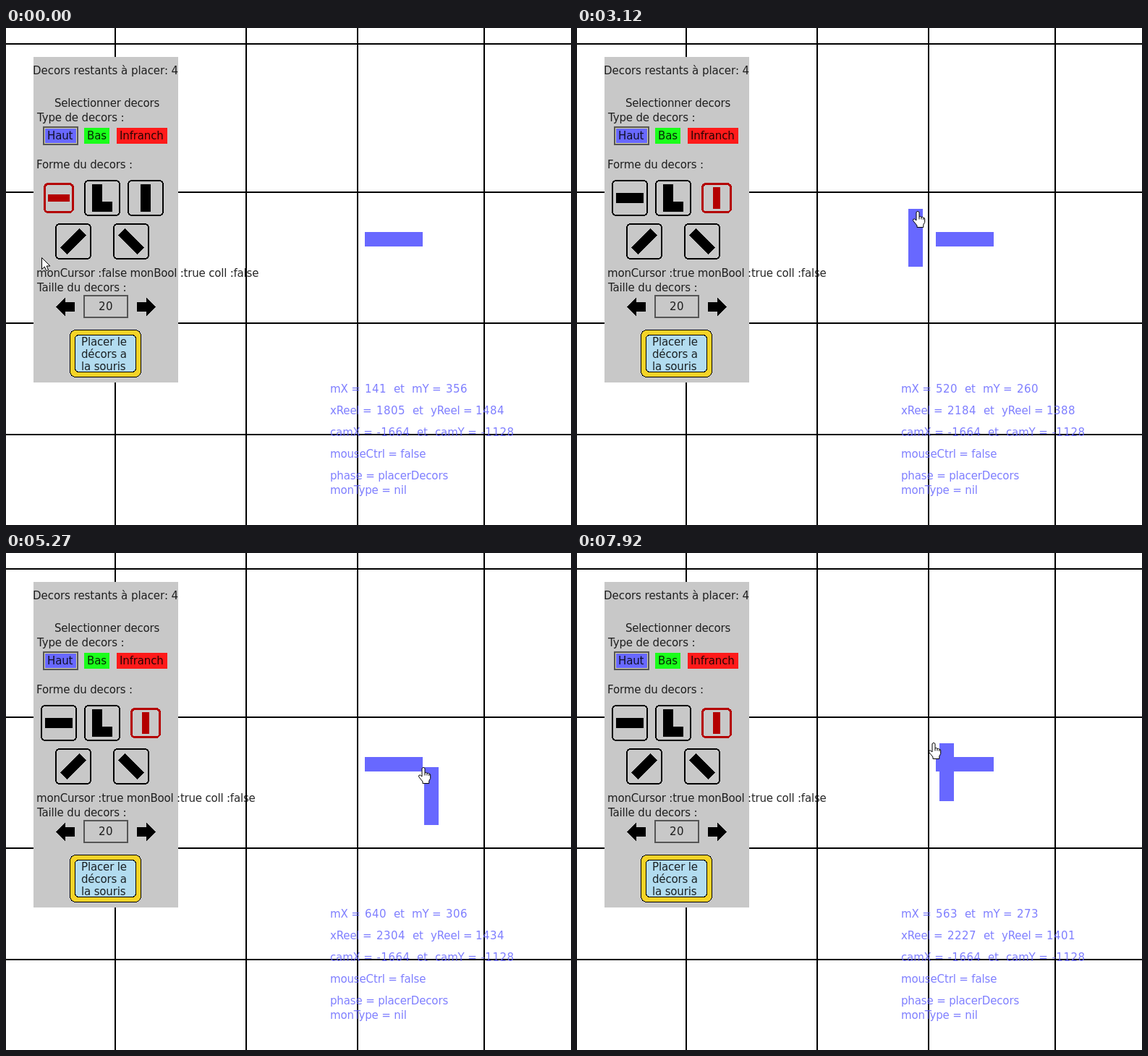
These frames come from a looping animation (781 by 687 pixels, 7990 ms). An HTML page:

```html
<!DOCTYPE html>
<html lang="fr">
<head>
<meta charset="utf-8">
<title>Placement des décors</title>
<style>
  html, body { margin: 0; width: 100%; height: 100%; overflow: hidden; background: #fff; }
  svg { display: block; shape-rendering: crispEdges; }
  text { font: 15px "DejaVu Sans", sans-serif; letter-spacing: -.15px; fill-opacity: .85; }
  .num { letter-spacing: .46px; }
  .debug, .block { fill: #6868ff; }
  .shape rect { fill: none; stroke: #000; stroke-width: 2; }
  .shape.on rect { stroke: #b40000; stroke-width: 3; }
  .shape.on path { fill: #b40000; }
  #cursor { shape-rendering: geometricPrecision; }
</style>
</head>
<body>
<svg width="781" height="687" viewBox="0 0 781 687">
  <path d="M151 0V687M332 0V687M486 0V687M661 0V687M0 22H781M0 227H781M0 408H781M0 562H781" stroke="#000" stroke-width="2"/>
  <rect class="block" x="496" y="282" width="80" height="20"/>
  <rect class="block" id="bar" width="20" height="80"/>
  <rect x="38" y="40" width="200" height="450" fill="#c8c8c8"/>

  <rect x="52" y="137" width="47" height="24" fill="#d8d4a0" stroke="#555" stroke-width="2"/>
  <rect class="block" x="54" y="139" width="43" height="20"/>
  <rect x="108" y="138" width="35" height="22" fill="#1aff1a"/>
  <rect x="153" y="138" width="70" height="22" fill="#ff1a1a"/>

  <g id="shapes"></g>

  <path id="left" d="M69 385.5L82 373V379H95V392H82V398Z"/>
  <use href="#left" transform="translate(276) scale(-1 1)"/>
  <rect x="108" y="370" width="60" height="30" fill="none" stroke="#555" stroke-width="2"/>
  <rect x="88.5" y="417.5" width="98" height="65" rx="8" fill="#f5d327" stroke="#000"/>
  <rect x="95.5" y="424.5" width="84" height="51" rx="5" fill="#b2dcf0" stroke="#000"/>

  <g id="labels"></g>
  <g id="cursor" fill="#fff" stroke="#000" stroke-linejoin="round">
    <path id="arrow" d="M.5 .5V16.5L4.3 13L6.8 18.6L9.6 17.4L7.2 12H12Z"/>
    <path id="hand" d="M-2 1.6Q0 -1 2 1.6V8Q4 6.5 5 8.5Q7 7.5 7.8 9.3Q9.6 9 9.7 11V15.5L7.8 19V22.5H-1V20L-6.3 13.5Q-7 10.6 -4.5 10.9L-2 13ZM2 8V11.5M5 8.6V11.5M7.8 9.4V12"/>
  </g>
</svg>
<script>
const LOOP = 7990;
const $ = id => document.getElementById(id);
const clamp = (v, lo, hi) => Math.max(lo, Math.min(hi, v));

function add(parent, tag, attrs, content = '') {
  const el = document.createElementNS('http://www.w3.org/2000/svg', tag);
  for (const k in attrs) el.setAttribute(k, attrs[k]);
  el.textContent = content;
  return parent.appendChild(el);
}
function label(x, y, s, cls = '', spacing = '') {
  const el = add($('labels'), 'text', { x, y, class: cls }, s);
  el.style.letterSpacing = spacing;
  return el;
}
const setText = (el, s) => { if (el.textContent !== s) el.textContent = s; };
const show = (id, on) => $(id).setAttribute('visibility', on ? 'visible' : 'hidden');

// Shape buttons, drawn around their centre and smaller when selected
const slab = (w, h) => `M${-w / 2} ${-h / 2}h${w}v${h}h${-w}Z`;
function shapeButton(x, y, angle = 0, outline = slab(38, 14)) {
  const g = add($('shapes'), 'g', { transform: `translate(${x} ${y})` });
  const frame = add(g, 'rect', { rx: 5 });
  const icon = add(g, 'path', { transform: `rotate(${angle})` });
  const select = on => {
    const r = on ? 19.5 : 24;
    g.setAttribute('class', on ? 'shape on' : 'shape');
    for (const k of ['x', 'y']) frame.setAttribute(k, -r);
    for (const k of ['width', 'height']) frame.setAttribute(k, 2 * r);
    icon.setAttribute('d', on ? slab(30, 10) : outline);
  };
  select(false);
  return select;
}
const selectFlat = shapeButton(73, 235);
const selectUpright = shapeButton(193, 235, 90);
shapeButton(133, 235, 0, 'M-14 -19H0V5H14V19H-14Z');
shapeButton(93, 295, -45);
shapeButton(173, 295, 45);

// Panel texts
label(37, 64, 'Decors restants à placer: 4', '', '-.05px');
label(67, 109, 'Selectionner decors', '', '-.2px');
label(43, 129, 'Type de decors :');
label(57, 154, 'Haut');
label(112, 154, 'Bas');
label(157, 154, 'Infranch');
label(42, 194, 'Forme du decors :');
const state = label(42, 344, '', '', '-.2px');
label(43, 364, 'Taille du decors :');
label(128, 390, '20', 'num');
['Placer le', 'décors a', 'la souris'].forEach((s, i) => label(104, 439 + 17 * i, s));

// Mouse and camera read-out
const word = (x, y, s) => label(x, y, s, 'debug');
const number = (x, y) => label(x, y, '', 'debug num');
function pair(y, nameA, xA, xEt, nameB, xB) {
  word(448, y, nameA + ' =');
  word(xEt, y, 'et');
  word(xEt + 25, y, nameB + ' =');
  return [number(xA, y), number(xB, y)];
}
const mouse = pair(504, 'mX', 496, 536, 'mY', 608);
const real = pair(534, 'xReel', 512, 562, 'yReel', 649);
const cam = pair(564, 'camX', 512.5, 568, 'camY', 656.5);
const CAM = [-1664, -1128];
cam.forEach((el, i) => setText(el, String(CAM[i])));
word(448, 594, 'mouseCtrl = false');
word(448, 624, 'phase = placerDecors');
word(448, 644, 'monType = nil');

// The game runs in even ticks, with one short pause
const TICK = 76.4, PAUSE_AT = 5690, PAUSE = 270;
function tickAt(ms) {
  const active = ms - clamp(ms - PAUSE_AT, 0, PAUSE);
  return Math.min(100, Math.floor(active / TICK + .4));
}

const HOVER = 9, PICK = 13, PLACE = 23;
// Turning points of the pointer: [tick, x, y]
const PATH = [
  [-1, 79, 346], [0, 49, 317], [5, 85, 206], [PICK, 192, 238],
  [16, 137, 415], [17, 132, 441], [PLACE, 132, 450], [31, 370, 230],
  [40, 458, 250], [54, 635, 290], [55, 625, 305], [61, 610, 250],
  [68, 578, 296], [75, 574, 296], [79, 642, 287], [80, 645, 283], [99, 501, 263],
];
function pointer(tick) {
  const next = PATH.findIndex(p => p[0] > tick);
  const i = next < 0 ? PATH.length - 1 : next;
  const [t0, ...from] = PATH[i - 1], [t1, ...to] = PATH[i];
  const u = (tick - t0) / (t1 - t0);
  return from.map((v, k) => Math.round(v + (to[k] - v) * u));
}

function render(ms) {
  const tick = tickAt(ms);
  const held = pointer(tick - 1); // the game reads the pointer one tick late
  const placing = tick >= PLACE;

  selectFlat(tick < PICK);
  selectUpright(tick >= PICK);
  setText(state, `monCursor :${placing} monBool :true coll :false`);

  [held[0] + 62, held[1] + 10].forEach((v, i) => {
    setText(mouse[i], String(v));
    setText(real[i], String(v - CAM[i]));
  });

  show('bar', placing);
  $('bar').setAttribute('transform', `translate(${held})`);
  show('hand', tick >= HOVER);
  show('arrow', tick < HOVER);
  $('cursor').setAttribute('transform', `translate(${pointer(tick)})`);
}

const start = performance.now();
function loop() {
  render((performance.now() - start) % LOOP);
  requestAnimationFrame(loop);
}
loop();
</script>
</body>
</html>
```
